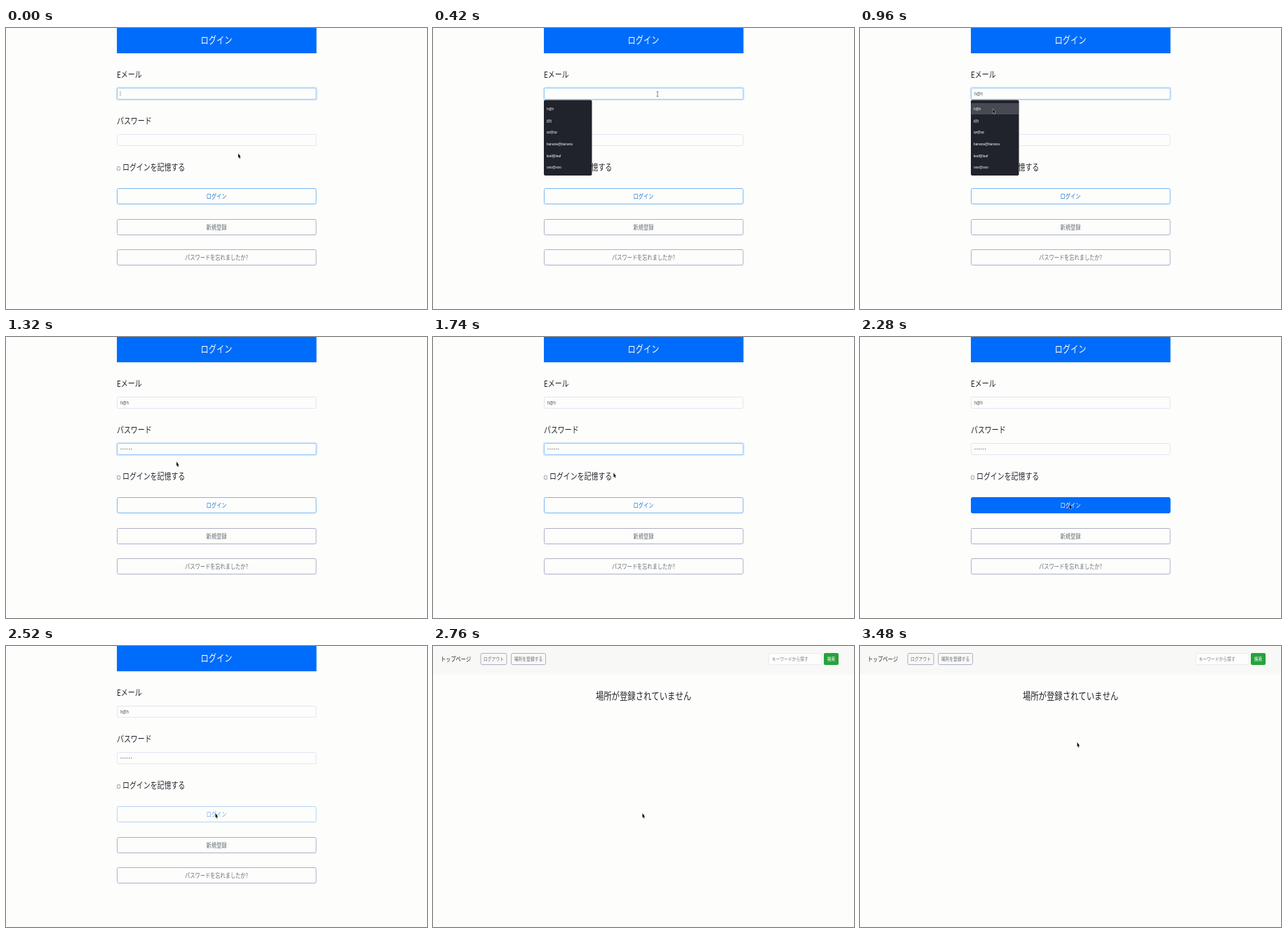
An HTML page with a canvas that plays this animation: 600x400 px, repeating every 3.66 s.

```html
<!DOCTYPE html>
<html lang="ja">
<head>
<meta charset="utf-8">
<title>ログイン</title>
<style>
  html, body { margin: 0; width: 100%; height: 100%; overflow: hidden; background: #fdfdfc; }
  canvas { display: block; }
</style>
</head>
<body>
<canvas id="stage" width="600" height="400"></canvas>
<script>
const ctx = document.getElementById('stage').getContext('2d');
const LOOP = 3660, STEP = 60;
const SQUEEZE = 0.8; // the whole page is narrowed horizontally
const JP = '"Noto Sans CJK JP", "Noto Sans CJK", sans-serif';
const LATIN = '"Liberation Sans", sans-serif';
const C = {
  page: '#fdfdfc', nav: '#f8f8f6', ink: '#212529', blue: '#006cfb',
  green: '#27a23c', grey: '#656c73', greyLine: '#adb0c6',
  field: '#e4e5f2', focus: '#93c6f8', glow: '#dcedfd', menu: '#20232b'
};
const EMAIL = 'h@h';
const SUGGESTIONS = [EMAIL, 'j@j', 'qv@qv', 'banana@banana', 'leaf@leaf', 'ooo@ooo'];

// Event times in ms
const MENU_OPEN = 360, PREVIEW = 900, PICK = 1140, PASSWORD_FOCUS = 1200;
const HOVER = 1800, SUBMIT = 2280, NEXT_PAGE = 2760;

// Pointer tip: time, x, y
const PATH = [
  [0, 331, 178.5], [300, 320, 94], [600, 320, 94], [900, 190, 115],
  [1140, 186, 115], [1200, 207, 158], [1320, 243, 177.5], [1680, 243, 177.5],
  [1860, 298.5, 238], [2820, 298.5, 238], [3240, 330, 236],
  [3480, 309.5, 137], [LOOP, 309.5, 137]
];

const clamp = v => Math.max(0, Math.min(1, v));
const ease = v => v * v * (3 - 2 * v);

function pointerAt(t) {
  const i = Math.max(1, PATH.findIndex(p => p[0] > t));
  const [t0, x0, y0] = PATH[i - 1], [t1, x1, y1] = PATH[i];
  const k = ease(clamp((t - t0) / (t1 - t0)));
  return { x: x0 + (x1 - x0) * k, y: y0 + (y1 - y0) * k };
}

function text(str, x, centerY, size, color, { align = 'left', family = JP, weight = 400 } = {}) {
  ctx.save();
  ctx.translate(x, centerY + size * 0.38);
  ctx.scale(SQUEEZE, 1);
  ctx.font = `${weight} ${size}px ${family}`;
  ctx.textAlign = align;
  ctx.fillStyle = color;
  ctx.fillText(str, 0, 0);
  ctx.restore();
}

const label = (str, x, y) => text(str, x, y, 12.4, C.ink, { weight: 500 });

function box(x, y, w, h, { fill, line, radius = 2, width = 1 }) {
  ctx.beginPath();
  ctx.roundRect(x, y, w, h, radius);
  if (fill) { ctx.fillStyle = fill; ctx.fill(); }
  if (line) { ctx.strokeStyle = line; ctx.lineWidth = width; ctx.stroke(); }
}

function field(y, focused) {
  if (focused) box(158, y - 0.5, 284.5, 17, { line: C.glow, width: 3 });
  box(158.5, y, 283.5, 16, { fill: C.page, line: focused ? C.focus : C.field });
}

function button(str, y, line, color, fill) {
  box(158.5, y, 283.5, 22, { fill, line });
  text(str, 300, y + 11, 9, color, { align: 'center', weight: 500 });
}

function shape(points, fill, line, width) {
  ctx.beginPath();
  points.forEach(([x, y]) => ctx.lineTo(x, y));
  ctx.closePath();
  ctx.lineJoin = 'round';
  ctx.strokeStyle = line;
  ctx.lineWidth = width;
  ctx.stroke();
  ctx.fillStyle = fill;
  ctx.fill();
}

const cursors = {
  arrow() {
    shape([[0, 0], [0, 6.2], [1.1, 5.2], [2, 7.4], [3, 7], [2.1, 4.9], [3.5, 4.8]], '#08080a', '#fdfdfc', 0.8);
  },
  beam() {
    ctx.strokeStyle = '#55585c';
    ctx.lineWidth = 0.7;
    ctx.beginPath();
    ctx.moveTo(-1.4, -3.3); ctx.lineTo(1.4, -3.3);
    ctx.moveTo(0, -3.3); ctx.lineTo(0, 3.3);
    ctx.moveTo(-1.4, 3.3); ctx.lineTo(1.4, 3.3);
    ctx.stroke();
  },
  hand() {
    shape([[-0.5, 0], [0.6, 0], [0.7, 2.5], [2.8, 3.2], [2.6, 5.7], [1.8, 7], [-0.5, 7], [-2, 4.2], [-0.5, 4.5]],
      '#fffbea', '#33343a', 0.9);
  }
};

function cursorKind(t, y) {
  if (t >= NEXT_PAGE) return 'arrow';
  if (t >= HOVER && t < SUBMIT) return 'hand';
  const inEmail = y > 84 && y < 103 && t < PREVIEW;
  const inPassword = y > 150 && y < 169 && (t < MENU_OPEN || t >= PICK);
  return inEmail || inPassword ? 'beam' : 'arrow';
}

function drawCursor(t) {
  const { x, y } = pointerAt(t);
  ctx.save();
  ctx.translate(x, y);
  cursors[cursorKind(t, y)]();
  ctx.restore();
}

function drawMenu(t) {
  box(158, 102.5, 68.5, 107.5, { fill: C.menu });
  if (t >= PREVIEW) box(158.5, 107, 67.5, 16, { fill: '#474a52', radius: 0 });
  SUGGESTIONS.forEach((s, i) => text(s, 162, 115 + i * 16.6, 6, '#ffffff', { family: LATIN }));
}

function drawSubmit(t) {
  if (t >= SUBMIT) {
    button('ログイン', 228.5, '#b4d5f8', '#72a9f3');
    ctx.globalAlpha = 1 - clamp((t - SUBMIT) / 120);
    button('ログイン', 228.5, C.blue, C.page, C.blue);
    ctx.globalAlpha = 1;
  } else if (t >= HOVER) {
    button('ログイン', 228.5, C.blue, C.page, t > HOVER ? C.blue : '#80b5fa');
  } else {
    button('ログイン', 228.5, '#76b6f6', '#1b72d6');
  }
}

function drawLogin(t) {
  ctx.fillStyle = C.blue;
  ctx.fillRect(158, 0, 284.5, 36);
  text('ログイン', 300, 16.5, 14, C.page, { align: 'center' });

  label('Eメール', 158, 66);
  field(85.5, t < PASSWORD_FOCUS);
  if (t >= PREVIEW) text(EMAIL, 163, 93.5, 7, '#495057', { family: LATIN });
  else if (t < 120) {
    ctx.fillStyle = '#b5a58a';
    ctx.fillRect(162.5, 90, 0.9, 7);
  }

  label('パスワード', 158, 132);
  field(151.5, t >= PASSWORD_FOCUS && t < SUBMIT);
  const dots = Math.round(clamp((t - PASSWORD_FOCUS) / 120) * 6);
  ctx.fillStyle = '#5c636a';
  for (let i = 0; i < dots; i++) {
    ctx.beginPath();
    ctx.arc(164 + i * 2.9, 159.5, 0.65, 0, Math.PI * 2);
    ctx.fill();
  }

  box(158.5, 197.5, 4, 5, { line: '#9698a2', radius: 0.5, width: 0.8 });
  label('ログインを記憶する', 166, 198.5);

  drawSubmit(t);
  button('新規登録', 272.5, C.greyLine, C.grey);
  button('パスワードを忘れましたか?', 315.5, C.greyLine, C.grey);
  if (t >= MENU_OPEN && t < PICK) drawMenu(t);
}

function navButton(str, x, w) {
  box(x, 10.5, w, 16, { line: C.greyLine });
  text(str, x + w / 2, 18.5, 7.2, C.grey, { align: 'center', weight: 500 });
}

function drawTop() {
  ctx.fillStyle = C.nav;
  ctx.fillRect(0, 0, 600, 40);
  text('トップページ', 11, 18.5, 9, C.ink, { weight: 500 });
  navButton('ログアウト', 68, 37);
  navButton('場所を登録する', 111.5, 49);
  box(478.5, 10.5, 75.5, 16, { fill: C.page, line: '#eaebf1' });
  text('キーワードから探す', 483, 18.5, 7.2, '#777e85');
  box(557, 10, 21, 17, { fill: C.green });
  text('検索', 567.5, 18.5, 7.2, C.page, { align: 'center', weight: 500 });
  text('場所が登録されていません', 300, 71, 14.2, C.ink, { align: 'center' });
}

function frame(elapsed) {
  const t = Math.floor((elapsed % LOOP) / STEP) * STEP;
  ctx.fillStyle = C.page;
  ctx.fillRect(0, 0, 600, 400);
  if (t < NEXT_PAGE) drawLogin(t);
  else drawTop();
  drawCursor(t);
}

const start = performance.now();
function tick() {
  frame(performance.now() - start);
  requestAnimationFrame(tick);
}
tick();
</script>
</body>
</html>
```
